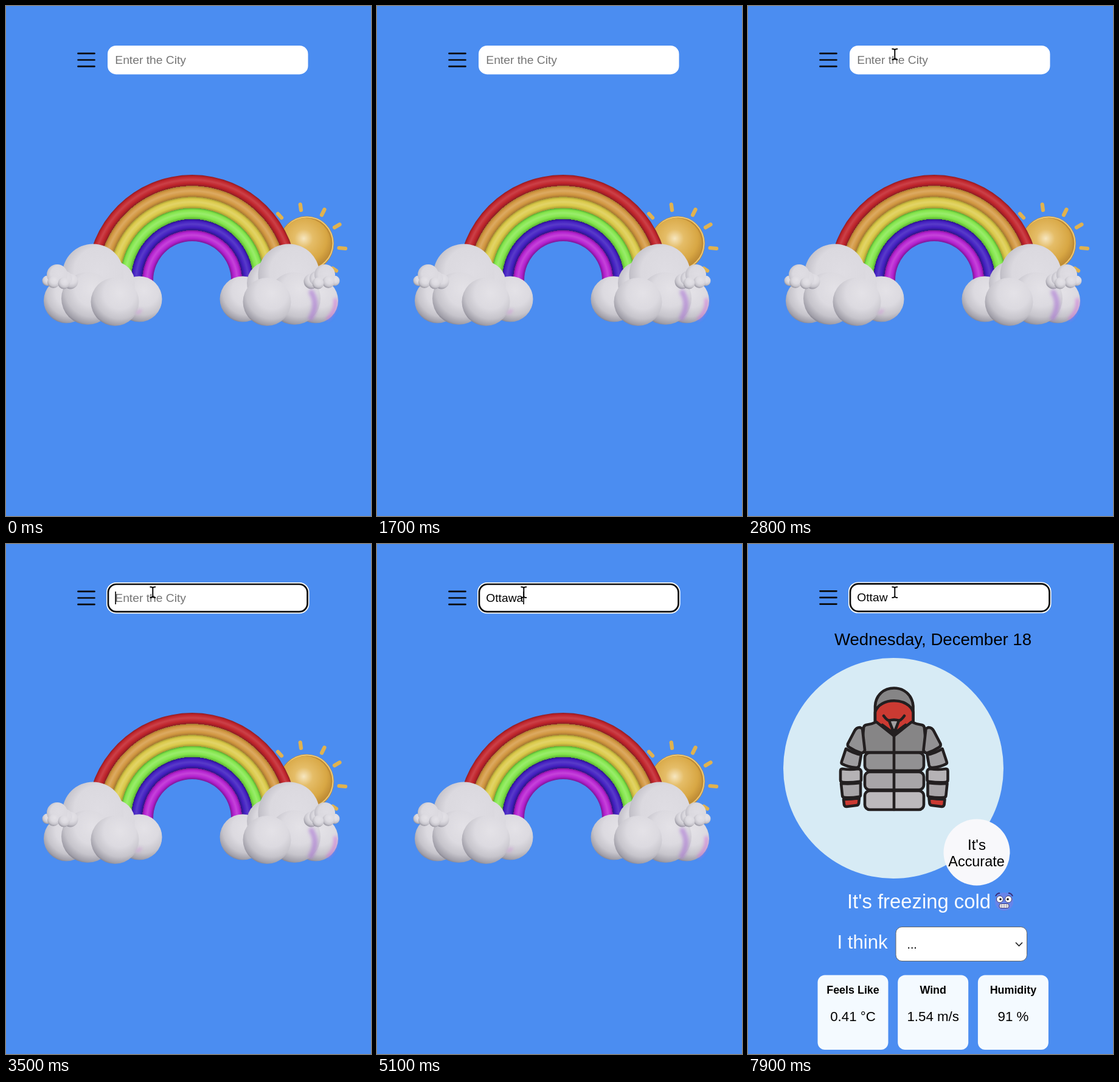
These frames come from a looping animation (600 by 837 pixels, 8000 ms). An HTML page:

```html
<!DOCTYPE html>
<html lang="en">
<head>
<meta charset="utf-8">
<title>Weather search</title>
<style>
  html, body { margin: 0; height: 100%; overflow: hidden; background: #4b8df1; }
  svg { display: block; width: 100vw; height: 100vh; font-family: "Liberation Sans", Arial, sans-serif; }
  .mid { text-anchor: middle; }
  #jacket { stroke: #231f20; stroke-width: 4.6; stroke-linejoin: round; stroke-linecap: round; }
</style>
</head>
<body>
<svg viewBox="0 0 600 837">
  <defs>
    <radialGradient id="puff" cx=".6" cy=".32" r=".74">
      <stop offset="0" stop-color="#e4e2e7"/>
      <stop offset=".45" stop-color="#dcdae0"/>
      <stop offset=".72" stop-color="#c6c4cb"/>
      <stop offset=".9" stop-color="#a09ea8"/>
      <stop offset="1" stop-color="#74727e"/>
    </radialGradient>
    <radialGradient id="crown" cx=".6" cy=".46" r=".68">
      <stop offset="0" stop-color="#dfdde3"/>
      <stop offset=".6" stop-color="#dbd9df"/>
      <stop offset=".85" stop-color="#c3c1c9"/>
      <stop offset="1" stop-color="#a19fa9"/>
    </radialGradient>
    <radialGradient id="gold" cx=".47" cy=".4" r=".6">
      <stop offset="0" stop-color="#f6e6c0"/>
      <stop offset=".3" stop-color="#e5bd68"/>
      <stop offset=".75" stop-color="#d8a744"/>
      <stop offset="1" stop-color="#bd8a34"/>
    </radialGradient>
    <filter id="soft" x="-50%" y="-50%" width="200%" height="200%"><feGaussianBlur stdDeviation="2.6"/></filter>
    <radialGradient id="rings" gradientUnits="userSpaceOnUse" cx="306" cy="450" r="173"/>
    <g id="sleeve">
      <path fill="#929193" d="M184 301Q178 301 175 307L164 328Q163 332 167 334Q176 340 186 343Q191 343 192 338L188 303Z"/>
      <path fill="#9f9da0" d="M161 336Q172 343 186 346L183 363Q182 368 177 367Q164 366 155 361Q153 360 154 357Z"/>
      <path fill="#b5b2b5" d="M155 369Q168 371 181 369Q185 369 186 373V387Q186 390 182 390Q168 392 156 391Q152 391 152 387V373Q152 369 155 369Z"/>
      <path fill="#a8a5a8" d="M153 393Q169 394 185 392L185 412Q185 415 181 415Q170 417 159 416Q155 416 155 412Z"/>
      <path fill="#cb3a32" d="M157 419Q170 419 183 417L182 426Q181 429 178 429L162 431Q159 431 158 428Z"/>
    </g>
  </defs>

  <g id="bar">
    <path d="M118.5 77.9H145.5M118.5 88.5H145.5M118.5 99.200H145.5" stroke="#0a0a0a" stroke-width="2.7" stroke-linecap="round"/>
    <rect x="167" y="65" width="329.5" height="47.2" rx="14" fill="#fff"/>
    <g id="focus" fill="#fff">
      <rect x="165" y="63" width="333.5" height="51.2" rx="16"/>
      <rect x="168" y="66" width="327.5" height="45.2" rx="13.5" stroke="#0c0c0c" stroke-width="2.7"/>
    </g>
    <text id="entry" x="179.300" y="95" font-size="19.25"></text>
    <rect id="caret" y="78" width="1.6" height="21" fill="#000"/>
  </g>

  <g id="home">
    <path d="M483.7 325.5L485 335M523.5 334L519 343M548.5 358.5L540 363.5M547.5 397L558 398M447 341L453 347.5M537 430.5L543 434.5"
      stroke="#e0b250" stroke-width="6.2" stroke-linecap="round"/>
    <circle cx="494" cy="390" r="45" fill="#c08c34"/>
    <circle cx="494.500" cy="389.500" r="43" fill="none" stroke="#ecc878" stroke-width="2"/>
    <circle cx="492" cy="390" r="42" fill="url(#gold)"/>
    <path fill="url(#rings)" d="M133 454V450A173 173 0 0 1 479 450V454H370V450A64 64 0 0 0 242 450V454Z"/>
    <g id="clouds"></g>
    <g fill="none" filter="url(#soft)" stroke-linecap="round">
      <path d="M502 470Q514 490 501 512" stroke="#b07fd6" stroke-width="9" opacity=".65"/>
      <path d="M541 482Q544 498 529 513" stroke="#d765e0" stroke-width="5" opacity=".6"/>
      <path d="M216 504L221 500" stroke="#d765e0" stroke-width="4" opacity=".35"/>
    </g>
  </g>

  <g id="result">
    <text class="mid" x="304" y="166" font-size="27.6">Wednesday, December 18</text>
    <circle cx="239" cy="368" r="181" fill="#d7ebf5"/>
    <g id="jacket">
      <path fill="#868586" d="M209 294V266C210 247 224 236.500 240 236.500S270 247 271.500 266V294Z"/>
      <path fill="#cb3a32" d="M209 276C216 251 264 251 271.500 276V292L240 313L209 292Z"/>
      <path fill="#868586" d="M194 297Q203 296 211 292L240 315L269 292Q277 296 286 297Q290 298 290 303L293 334Q292 342 285 342H195Q188 342 187 334L190 303Q190 298 194 297Z"/>
      <path fill="#a2a0a2" d="M231 290Q240 287 249 290L240 310Z"/>
      <path fill="#cb3a32" d="M223 282Q228 289 232 290L240 311L221 297M257 282Q252 289 248 290L240 311L259 297"/>
      <rect x="192" y="342.500" width="97" height="29.500" rx="8" fill="#929193"/>
      <rect x="192" y="374" width="97" height="29.500" rx="8" fill="#a8a5a8"/>
      <rect x="192" y="405" width="97" height="31" rx="8" fill="#bcb9bc"/>
      <path d="M240 311V436"/>
      <use href="#sleeve"/>
      <use href="#sleeve" transform="translate(480.500) scale(-1 1)"/>
    </g>
    <circle cx="376" cy="506" r="54.5" fill="#f8f8fb"/>
    <g class="mid">
      <text x="376" y="501.500" font-size="24">It's</text>
      <text x="375.500" y="528.500" font-size="23.4">Accurate</text>
    </g>
    <g fill="#f8fbff">
      <text x="163" y="598" font-size="32.8">It's freezing cold</text>
      <text x="146.500" y="664" font-size="31.200">I think</text>
    </g>
    <circle cx="421" cy="587" r="15" fill="#6784ea"/>
    <path d="M407 578Q409 573 414 573M435 578Q433 573 428 573" fill="none" stroke="#3c2d78" stroke-width="2"/>
    <g fill="#fff" stroke="#40366e">
      <circle cx="414" cy="583" r="5.500"/>
      <circle cx="428" cy="583" r="5.500"/>
      <rect x="413" y="590.500" width="16" height="7" rx="3"/>
    </g>
    <path d="M413 594H429M417 591V597M421 591V597M425 591V597" stroke="#77728e" stroke-width=".7"/>
    <circle cx="415" cy="583" r="1.800"/>
    <circle cx="427" cy="583" r="1.800"/>
    <rect x="243" y="628.500" width="215.500" height="56" rx="10" fill="#fff" stroke="#666"/>
    <text x="261.500" y="664" font-size="19.4">...</text>
    <path d="M440 654L445.500 659.500L451 654" fill="none" stroke="#222" stroke-width="1.700"/>
    <g id="cards" class="mid"></g>
  </g>

  <path id="pointer" d="M236.500 70.500Q241.300 70 241.300 73Q241.300 70 246 70.500M241.300 73V85M236.500 88Q241.300 88.500 241.300 85Q241.300 88.500 246 88"
    fill="none" stroke="#000" stroke-width="1.9"/>
</svg>
<script>
const $ = id => document.getElementById(id);
const show = (id, on) => $(id).setAttribute('visibility', on ? 'visible' : 'hidden');

// Six glossy tubes, outermost first: shade, body, shine
const tubes = [
  ['#8d1d24', '#bf242b', '#cb4148'], ['#a57732', '#d19640', '#dcaa62'],
  ['#a99a34', '#d9c848', '#e2d468'], ['#5bae35', '#82e54a', '#9aec6c'],
  ['#2c1688', '#431fc0', '#593bc9'], ['#7d1795', '#b421cf', '#c544da']
];
$('rings').innerHTML = tubes.map(([shade, body, shine], i) =>
  [[1, shade], [.82, body], [.55, shine], [.25, body], [0, shade]].map(([u, color]) =>
    `<stop offset="${(173 - 18.17 * (i + 1 - u)) / 173}" stop-color="${color}"/>`)
    .reverse().join('')).reverse().join('');

// The right cloud mirrors the left one, but both are lit from the upper right
const puffs = [
  [219, 481, 37.5, 'puff'], [176, 455, 36, 'crown'], [99, 483.5, 37, 'puff'], [143, 441, 50.5, 'crown'],
  [134, 480, 43, 'puff'], [179, 485.5, 39.5, 'puff'],
  [68, 451, 8.5, 'puff'], [106, 452, 12.5, 'puff'], [97, 447, 12, 'crown'], [84, 441, 17, 'crown'],
  [78, 453, 10, 'puff'], [95, 455, 9.5, 'puff']
];
$('clouds').innerHTML = [x => x, x => 608 - x].map(place => puffs.map(([x, y, r, fill]) =>
  `<circle cx="${place(x)}" cy="${y}" r="${r}" fill="url(#${fill})"/>`).join('')).join('');

$('cards').innerHTML = [['Feels Like', '0.41 °C'], ['Wind', '1.54 m/s'], ['Humidity', '91 %']]
  .map(([name, value], i) => {
    const x = 172.5 + 131.7 * i;
    return `<rect x="${x - 58}" y="707.500" width="116" height="122.500" rx="12" fill="#f4faff"/>
      <text x="${x}" y="737.500" font-size="17.9" font-weight="bold">${name}</text>
      <text x="${x}" y="783" font-size="22.3">${value}</text>`;
  }).join('');

const LOOP = 8000, POINTER = 2300, FOCUS = 3200, RESULT = 5300;
// Each edit: time, number of letters left in the field
const edits = [[FOCUS, 0], [3850, 1], [4050, 2], [4350, 3], [4500, 4], [4650, 5], [4800, 6], [7350, 5]];

function draw(now) {
  const t = now % LOOP, focused = t >= FOCUS, done = t >= RESULT;
  const [since, count] = edits.filter(e => e[0] <= t).pop() || [0, 0];
  const entry = $('entry');
  entry.textContent = count ? 'Ottawa'.slice(0, count) : 'Enter the City';
  entry.setAttribute('fill', count ? '#000' : '#757575');
  $('caret').setAttribute('x', 179.3 + (count ? entry.getComputedTextLength() : 0));
  show('caret', focused && (t - since) % 1000 < 500);
  show('focus', focused);
  show('pointer', t >= POINTER);
  show('home', !done);
  show('result', done);
  $('bar').setAttribute('transform', `translate(0 ${done ? -.6 : 0})`);
  requestAnimationFrame(draw);
}
requestAnimationFrame(draw);
</script>
</body>
</html>
```
